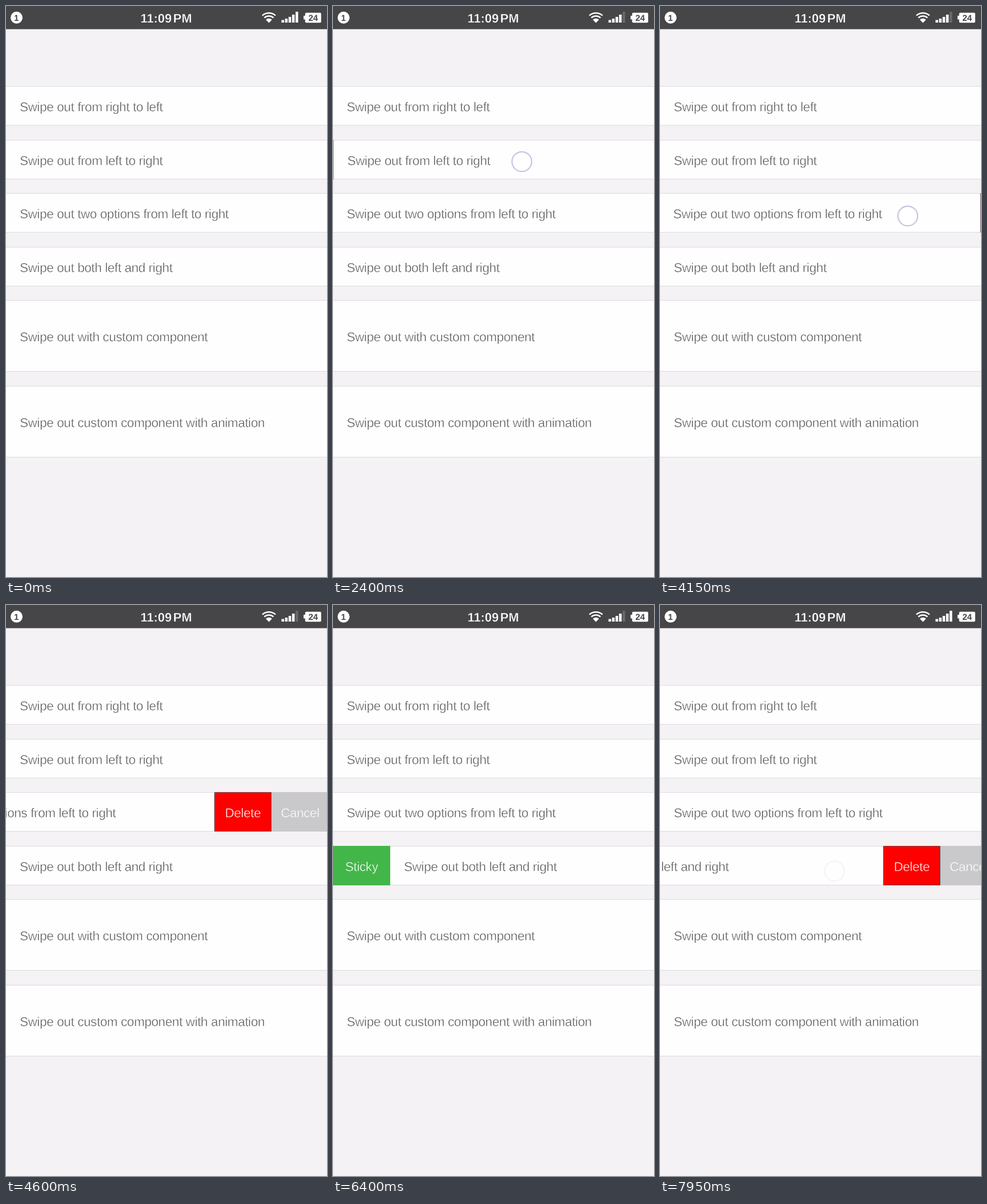
These frames come from a looping animation (561x998 px, 8000 ms). An HTML page:

```html
<!DOCTYPE html>
<html lang="en">
<head>
<meta charset="utf-8">
<title>Swipe rows</title>
<style>
  html, body { margin: 0; width: 100%; height: 100%; overflow: hidden; background: #f4f2f5; }
  svg { display: block; width: 561px; height: 998px; }
  text { font-family: "Liberation Sans", Arial, sans-serif; text-rendering: geometricPrecision; }
  .label { font-size: 22.4px; letter-spacing: -.365px; stroke-width: .5px; }
  .bold { font-weight: 700; }
</style>
</head>
<body>
<svg id="stage" viewBox="0 0 561 998">
  <rect width="561" height="998" fill="#f4f2f5"/>
  <g id="rows"></g>
  <circle id="ring" r="17.2" fill="#fff" fill-opacity=".3" stroke="#c6c5e1" stroke-width="2.2"/>
  <rect width="561" height="40.5" fill="#464547"/>
  <circle cx="18.5" cy="20.3" r="10.5" fill="#fff"/>
  <text class="bold" x="18.2" y="25.6" font-size="15" text-anchor="middle" fill="#464547">1</text>
  <g class="bold" font-size="21.8" fill="#fff" stroke="#464547" stroke-width=".4">
    <text x="235" y="28.5">11:09</text>
    <text x="292.3" y="28.5">PM</text>
  </g>
  <g fill="none" stroke="#fff" stroke-width="2.6">
    <path d="M448 16.6A17.3 17.3 0 0 1 471 16.6M451.5 20.6A12 12 0 0 1 467.5 20.6"/>
    <path d="M459.5 29.5L454.1 23.9A7.8 7.8 0 0 1 464.9 23.9Z" fill="#fff" stroke="none"/>
  </g>
  <g id="bars" fill="#fff"></g>
  <rect x="520" y="17" width="4" height="6.5" rx="1" fill="#fff"/>
  <rect x="522.8" y="11.8" width="28" height="17.4" rx="2" fill="#fff"/>
  <text class="bold" x="536.8" y="25.8" font-size="15" text-anchor="middle" fill="#464547">24</text>
</svg>
<script>
const LOOP = 8000, STEP = 50, WIDTH = 561, BUTTON = 100;
const GREEN = '#43b649', RED = '#fe0000', GREY = '#c9c8cb', RED_EDGE = '#6a5050';

const ROWS = [
  { y: 140, h: 69, text: 'Swipe out from right to left', right: [['Cancel', GREY]] },
  { y: 234, h: 69, text: 'Swipe out from left to right', left: ['Sticky', GREEN] },
  { y: 327, h: 69, text: 'Swipe out two options from left to right', right: [['Delete', RED], ['Cancel', GREY]] },
  { y: 421, h: 69, text: 'Swipe out both left and right', left: ['Sticky', GREEN], right: [['Delete', RED], ['Cancel', GREY]] },
  { y: 514, h: 125, text: 'Swipe out with custom component' },
  { y: 664, h: 125, text: 'Swipe out custom component with animation' },
];

// Each swipe: drag from start to release, then settle at end.
// offset = row position at those three times; finger = [x, y at start, y at release].
const SWIPES = [
  { row: 0, start: 550, release: 700, end: 950, offset: [-1, -75, -100], finger: [410, 184, 188] },
  { row: 0, start: 1550, release: 1750, end: 2000, offset: [-100, -22, 0], finger: [313, 192, 187] },
  { row: 1, start: 2400, release: 2650, end: 2900, offset: [1, 80, 100], finger: [330, 272, 268] },
  { row: 1, start: 3200, release: 3450, end: 3700, offset: [100, 20, 0], finger: [450, 267, 272] },
  { row: 2, start: 4150, release: 4390, end: 4650, offset: [-1, -165, -200], finger: [433, 367, 381] },
  { row: 2, start: 5100, release: 5250, end: 5550, offset: [-200, -40, 0], finger: [189, 381, 355] },
  { row: 3, start: 5950, release: 6150, end: 6400, offset: [1, 78, 100], finger: [275, 462, 458] },
  { row: 3, start: 6950, release: 7100, end: 7300, offset: [100, 24, 0], finger: [368, 456, 461] },
  { row: 3, start: 7650, release: 7825, end: 8100, offset: [-1, -151, -200], finger: [455, 458, 465] },
];
const TAP = { start: 4850, end: 4900, x: 428, y: 352, alpha: .25 };
const FADE = 150;

function add(parent, tag, attrs, content) {
  const el = document.createElementNS('http://www.w3.org/2000/svg', tag);
  for (const key in attrs) el.setAttribute(key, attrs[key]);
  if (content) el.textContent = content;
  return parent.appendChild(el);
}

function addLabel(parent, row, attrs, content) {
  add(parent, 'text', { class: 'label', y: row.y + row.h / 2 + 9.4, ...attrs }, content);
}

function addButton(parent, x, row, [name, color]) {
  const edge = color === RED ? RED_EDGE : color;
  add(parent, 'rect', {
    x: x + .5, y: row.y + .5, width: BUTTON - 1, height: row.h - 1, fill: color, stroke: edge,
  });
  addLabel(parent, row, { x: x + BUTTON / 2, 'text-anchor': 'middle', fill: '#fff', stroke: color }, name);
}

const rowsLayer = document.getElementById('rows');
const sliders = ROWS.map(row => {
  if (row.left) addButton(rowsLayer, 0, row, row.left);
  const slider = add(rowsLayer, 'g', {});
  add(slider, 'rect', { y: row.y, width: WIDTH, height: row.h, fill: '#dbdadd' });
  add(slider, 'rect', { y: row.y + 1, width: WIDTH, height: row.h - 2, fill: '#fefefe' });
  addLabel(slider, row, { x: 24, fill: '#585858', stroke: '#fefefe' }, row.text);
  (row.right || []).forEach((button, i) => addButton(slider, WIDTH + i * BUTTON, row, button));
  return slider;
});

const bars = [24.5, 22, 19, 15, 10].map((y, i) =>
  add(document.getElementById('bars'), 'rect', { x: 481.5 + i * 6.15, y, width: 4.5, height: 29 - y }));
const ring = document.getElementById('ring');

const mix = (a, b, u) => a + (b - a) * u;
const clamp = u => Math.min(1, Math.max(0, u));
const easeInOut = u => u < .5 ? 2 * u * u : 1 - 2 * (1 - u) ** 2;

function swipeOffset({ start, release, end, offset }, t) {
  return t < release
    ? mix(offset[0], offset[1], ((t - start) / (release - start)) ** 1.2)
    : mix(offset[1], offset[2], easeInOut(clamp((t - release) / (end - release))));
}

function placeRing(x, y, alpha) {
  ring.setAttribute('cx', x);
  ring.setAttribute('cy', y);
  ring.setAttribute('opacity', alpha);
}

function draw(t) {
  const offsets = ROWS.map(() => 0);
  placeRing(0, 0, 0);
  for (const swipe of SWIPES) {
    if (t < swipe.start) break;
    offsets[swipe.row] = swipeOffset(swipe, t);
    const { start, release, offset, finger } = swipe;
    const alpha = clamp(1 - (t - release) / FADE);
    if (alpha > 0) {
      const held = Math.min(t, release);
      placeRing(
        finger[0] + swipeOffset(swipe, held) - offset[0],
        mix(finger[1], finger[2], (held - start) / (release - start)),
        alpha);
    }
  }
  if (t >= TAP.start && t < TAP.end) placeRing(TAP.x, TAP.y, TAP.alpha);
  // Whole pixels keep the row edges crisp while they slide.
  sliders.forEach((slider, i) => slider.setAttribute('transform', `translate(${Math.round(offsets[i])} 0)`));
  bars[4].setAttribute('fill', t >= 250 && t < 7450 ? '#69686a' : '#fff');
}

function tick() {
  const t = performance.now() % LOOP;
  draw(Math.floor(t / STEP) * STEP);
  requestAnimationFrame(tick);
}
tick();
</script>
</body>
</html>
```
